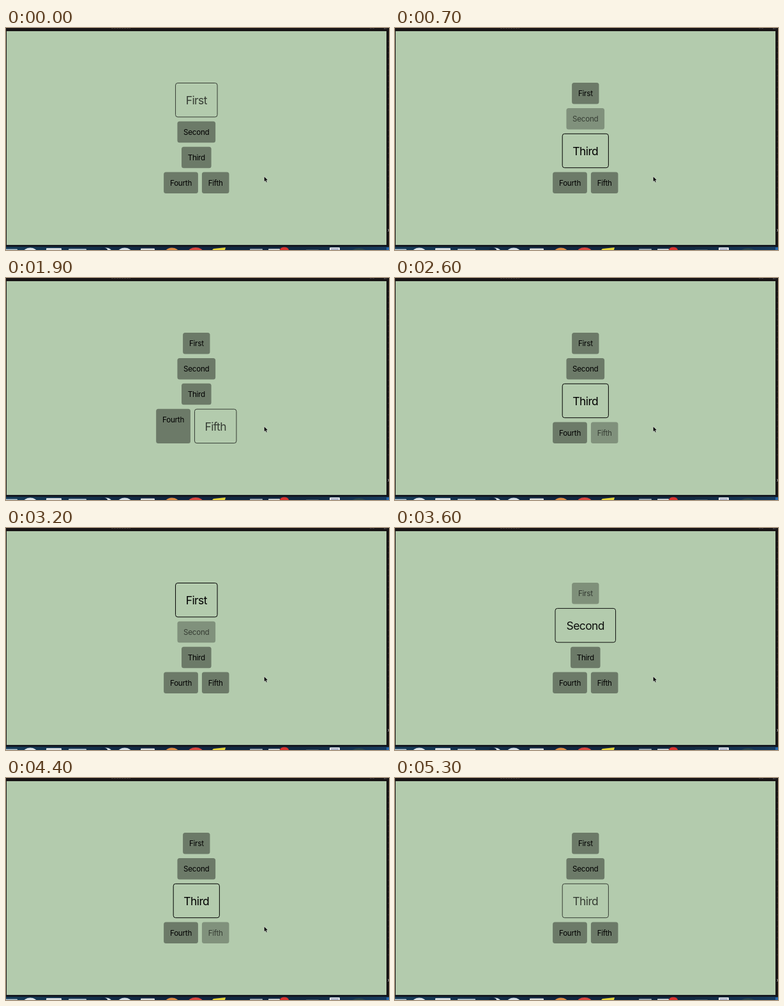
Recreate the animation shown at these times as an HTML page. Size 600 px wide and 349 px high, loop 5.7 s.

```html
<!DOCTYPE html>
<html lang="en">
<head>
<meta charset="utf-8">
<title>Focus navigation</title>
<style>
  html, body { margin: 0; width: 100%; height: 100%; overflow: hidden; background: #191516; }
  svg { display: block; width: 600px; height: 349px; }
  text { font-family: Inter, Roboto, sans-serif; text-anchor: middle; }
</style>
</head>
<body>
<svg id="stage" viewBox="0 0 600 349">
  <defs>
    <linearGradient id="dockFill" x2="1" y2="0">
      <stop offset="0" stop-color="#173c59"/>
      <stop offset=".4" stop-color="#10243e"/>
      <stop offset=".8" stop-color="#122a42"/>
      <stop offset="1" stop-color="#183c60"/>
    </linearGradient>
  </defs>
  <rect width="600" height="349" fill="#191516"/>
  <path d="M165 0h30M570 0h8M592 1h5" stroke="#4b4648" stroke-width="1.5" stroke-dasharray="3 1"/>
  <path d="M599 20v110M599 160v120" stroke="#302b2d" stroke-dasharray="2 7"/>
  <path d="M598.5 316l1.5 2-1.5 2" stroke="#aaa" fill="none"/>
  <rect x="1" y="5" width="595" height="336" fill="#b3cbad"/>
  <rect y="341" width="597" height="8" fill="#131820"/>
  <rect y="344" width="600" height="5" fill="url(#dockFill)"/>
  <rect x="596" y="345" width="4" height="4" fill="#2469b4"/>
  <g id="dock"></g>
  <g id="items"></g>
  <path id="cursor" d="M0 0v8.6l2-1.8 1.4 3 1.6-.7-1.4-3h2.8z" fill="#050505" stroke="#e8eee6" stroke-width=".6"/>
</svg>
<script>
const LOOP = 5700, TICK = 100;
const CENTER = 298.3, TOP = 86, GAP = 6.4, COL_GAP = 6;
const SMALL_H = 33.5, BIG_H = 54.4, DIM = 0.7;
const FOCUS_MS = 150, BLUR_MS = 250;

// label, width at rest, width when focused
const ITEMS = [
  ['First', 42.4, 66.5], ['Second', 59.7, 95.6], ['Third', 46.6, 73.2],
  ['Fourth', 53.8, 84], ['Fifth', 42.6, 66.5]
];
const ROWS = [[0], [1], [2], [3, 4]];
// time in ms, item that takes the focus
const MOVES = [
  [-1000, 0], [290, 1], [690, 2], [1060, 3], [1490, 4], [2590, 2], [2890, 1],
  [3190, 0], [3550, 1], [3750, 2], [3890, 3], [4090, 4], [4390, 2]
];

function add(parent, tag, attrs) {
  const el = document.createElementNS('http://www.w3.org/2000/svg', tag);
  set(el, attrs);
  parent.appendChild(el);
  return el;
}
function set(el, attrs) {
  for (const key in attrs) el.setAttribute(key, attrs[key]);
}
const byId = id => document.getElementById(id);

// visible tops of the dock icons: x, width, top, colour, round
const ICONS = [
  [8, 20, 347.5, '#b9c9d2', 0], [38, 22, 345.5, '#dce3e6', 1], [75, 24, 346, '#d5dcdf', 0],
  [112, 28, 347, '#a9bac4', 0], [157, 17, 345.5, '#d4dde4', 1], [186, 22, 345.5, '#d3dde4', 1],
  [222, 22, 346.5, '#d9dcda', 0], [260, 22, 345.5, '#dc8c45', 1], [297, 24, 345, '#d9463f', 1],
  [392, 20, 347, '#9ba5ad', 0], [420, 18, 347, '#c3c9cc', 0], [436, 14, 344.5, '#d8342f', 1],
  [480, 20, 348, '#3b5368', 0], [515, 16, 345, '#e4e7ea', 0], [553, 28, 346, '#294650', 1]
];
for (const [x, w, y, fill, round] of ICONS) {
  if (round) add(byId('dock'), 'ellipse', { cx: x, cy: y + w / 3, rx: w / 2, ry: w / 3, fill });
  else add(byId('dock'), 'rect', { x: x - w / 2, y, width: w, height: 6, rx: 1, fill });
}
add(byId('dock'), 'ellipse', { cx: 153, cy: 348.5, rx: 6, ry: 3, fill: '#10243e' });
add(byId('dock'), 'path', { d: 'M323 349l2-2 19-2-1 4z', fill: '#e5d43c' });
add(byId('dock'), 'path', { d: 'M509 347.5h12', stroke: '#6b79a5' });

const nodes = ITEMS.map(([label]) => {
  const group = add(byId('items'), 'g', {});
  const box = add(group, 'rect', { rx: 3.5 });
  const text = add(group, 'text', {});
  text.textContent = label;
  return { group, box, text };
});

const easeInOut = p => p < 0.5 ? 2 * p * p : 1 - 2 * (1 - p) * (1 - p);

function focusedAt(t) {
  let item = 0;
  for (const [start, next] of MOVES) if (start <= t) item = next;
  return item;
}

function opacityAt(item, t) {
  let from = 1, to = 1, begin = -2000, span = BLUR_MS, last = -1;
  const value = at => from + (to - from) * easeInOut(Math.min(1, (at - begin) / span));
  for (const [start, next] of MOVES) {
    if (start > t) break;
    if (next === item || last === item) {
      from = value(start);
      begin = start;
      to = next === item ? DIM : 1;
      span = next === item ? FOCUS_MS : BLUR_MS;
    }
    last = next;
  }
  return value(t);
}

function placeItem(i, x, y, w, h, big, t) {
  const { group, box, text } = nodes[i];
  const inset = big ? 0.5 : 0;
  set(group, { opacity: opacityAt(i, t).toFixed(3) });
  set(box, {
    x: x + inset, y: y + inset, width: w - 2 * inset, height: h - 2 * inset,
    fill: big ? 'none' : 'rgba(0,0,0,.4)', stroke: big ? '#000' : 'none'
  });
  set(text, {
    x: x + w / 2, y: y + (big ? 34 : 21.3),
    'font-size': big ? 17.5 : 11.7, 'letter-spacing': big ? -0.6 : -0.27
  });
}

function placeCursor(t) {
  const p = Math.max(0, (t - 4800) / 400);
  const x = 404.3 + 50 * p * p, y = 233.3 - 199 * p * p;
  set(byId('cursor'), {
    transform: `translate(${x} ${y})`,
    visibility: p > 1 ? 'hidden' : 'visible'
  });
}

function draw(t) {
  const focus = focusedAt(t);
  let y = TOP;
  for (const row of ROWS) {
    const h = row.includes(focus) ? BIG_H : SMALL_H;
    const widths = row.map(i => ITEMS[i][i === focus ? 2 : 1]);
    const total = widths.reduce((a, b) => a + b) + COL_GAP * (row.length - 1);
    let x = CENTER - total / 2;
    row.forEach((i, n) => {
      placeItem(i, x, y, widths[n], h, i === focus, t);
      x += widths[n] + COL_GAP;
    });
    y += h + GAP;
  }
  placeCursor(t);
}

const origin = performance.now();
function frame() {
  const t = (performance.now() - origin) % LOOP;
  draw(Math.floor(t / TICK) * TICK);
  requestAnimationFrame(frame);
}
frame();
</script>
</body>
</html>
```
